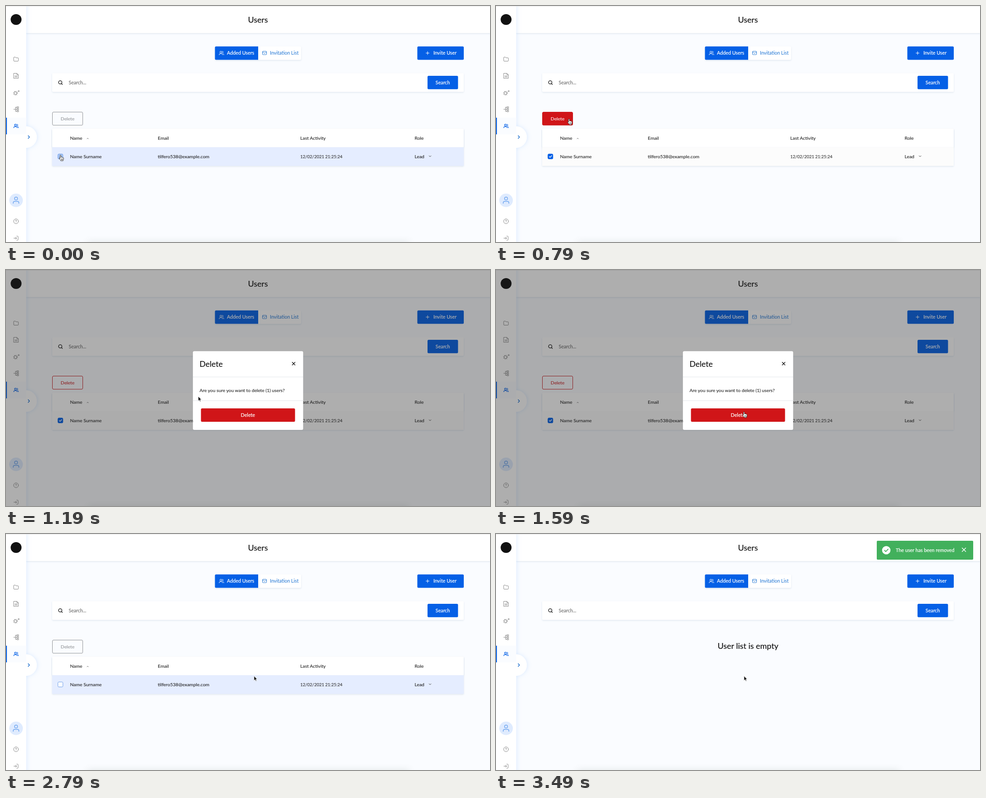
An HTML page for the animation above (3590 ms loop, 1069x524 px).

```html
<!DOCTYPE html>
<html lang="en">
<head>
<meta charset="utf-8">
<title>Users</title>
<style>
html, body { margin: 0; width: 100%; height: 100%; overflow: hidden; background: #fafcff; }
svg.stage { display: block; width: 100%; height: 100%; }
text { font: 10.4px Lato, "Open Sans", sans-serif; fill: #1c1c1c; stroke: #1c1c1c; stroke-width: .08; }
.big { font-size: 17.9px; fill: #111; stroke: #111; stroke-width: .15; }
.white { font-size: 10.75px; fill: #fff; stroke: #fff; stroke-width: .22; }
.mid { text-anchor: middle; }
.icon { fill: none; stroke: #777; stroke-width: 1; stroke-linecap: round; stroke-linejoin: round; }
.thin { stroke-width: .85; }
.blue { fill: #0560e6; }
.red { fill: #d01518; }
</style>
</head>
<body>
<svg class="stage" viewBox="0 0 1069 524" preserveAspectRatio="none">
  <defs>
    <filter id="card" x="-10%" y="-20%" width="120%" height="150%">
      <feDropShadow dx="0" dy="1.5" stdDeviation="1.8" flood-color="#34507c" flood-opacity=".13"/>
    </filter>
    <filter id="side" x="-60%" y="-60%" width="220%" height="220%">
      <feDropShadow dx="2" dy="0" stdDeviation="5" flood-color="#a9ccff" flood-opacity=".32"/>
    </filter>
    <filter id="soft" x="-10%" y="-200%" width="120%" height="500%">
      <feGaussianBlur stdDeviation="8"/>
    </filter>
    <g id="people">
      <circle cx="-1.4" cy="-2" r="2.1"/>
      <path d="M-5 4V3.2Q-5 1.3-3 1.3H.2Q2.2 1.3 2.2 3.2V4M2-4Q3.7-3.6 3.7-2T2 0M3.5 1.5Q5 1.8 5 3.3V4"/>
    </g>
  </defs>

  <rect width="1069" height="524" fill="#fafcff"/>
  <rect x="180" y="524" width="710" height="24" fill="#5a6b60" opacity=".14" filter="url(#soft)"/>
  <rect x="44" width="1025" height="60" fill="#fff" filter="url(#card)"/>
  <text class="big mid" x="556.5" y="36.5">Users</text>

  <!-- tabs and invite button -->
  <rect x="461.5" y="89.7" width="190.5" height="29.7" rx="3" fill="#fff" filter="url(#card)"/>
  <path class="blue" d="M464 89.7H557V119.4H464Q461.5 119.4 461.5 116.9V92.2Q461.5 89.7 464 89.7Z"/>
  <use href="#people" class="icon" x="476" y="104.5" style="stroke:#fff"/>
  <text class="white" x="488" y="108.3">Added Users</text>
  <g class="icon" style="stroke:#2b7cd6">
    <rect x="566.5" y="100.5" width="9" height="7.5" rx="1"/>
    <path d="M566.5 102L571 105L575.5 102"/>
  </g>
  <text x="583" y="108.3" style="fill:#2b7cd6;stroke:#2b7cd6;font-size:10.6px">Invitation List</text>
  <rect class="blue" x="908.5" y="89.7" width="102.6" height="29.7" rx="2.5"/>
  <path class="icon" d="M927.7 104.5H934.7M931.2 101V108" style="stroke:#fff"/>
  <text class="white" x="944" y="108.3">Invite User</text>

  <!-- search bar -->
  <rect x="102" y="149.3" width="909" height="41.2" rx="2" fill="#fff" filter="url(#card)"/>
  <g class="icon" style="stroke:#111;stroke-width:1.3">
    <circle cx="119.8" cy="169.5" r="3.7"/>
    <path d="M122.6 172.3L124.5 174.2"/>
  </g>
  <text x="138.5" y="173.8" style="fill:#666;stroke:#666;font-size:10.6px">Search...</text>
  <rect class="blue" x="931" y="155" width="67.4" height="29.7" rx="2.5"/>
  <text class="white mid" x="964.7" y="173.8">Search</text>

  <!-- user list -->
  <g id="list">
    <rect id="delBox" x="102.5" y="235.5" width="67" height="29.2" rx="2.5"/>
    <text id="delText" class="mid" x="136" y="254">Delete</text>
    <rect x="102" y="272.5" width="909" height="82.5" rx="2" fill="#fff" filter="url(#card)"/>
    <rect x="102" y="272.5" width="909" height="41" rx="2" fill="#fff" filter="url(#card)"/>
    <rect id="row" x="102" y="313.5" width="909" height="41.5"/>
    <g id="cells">
      <text x="141.5" y="296.6">Name</text>
      <path class="icon thin" d="M179 294.8L180.5 293.5L182 294.8" style="stroke:#444"/>
      <text x="335.3" y="296.6">Email</text>
      <text x="650" y="296.6">Last Activity</text>
      <text x="902.5" y="296.6">Role</text>
      <text x="141.5" y="337.5">Name Surname</text>
      <text x="335.3" y="337.5">tilfero538@example.com</text>
      <text x="650" y="337.5" style="fill:#333;font-size:9.5px">12/02/2021 21:25:24</text>
      <text x="902.5" y="337.5">Lead</text>
      <path class="icon" d="M934.5 332.6L936.6 334.7L938.7 332.6" style="stroke:#333"/>
      <rect id="box" x="114.7" y="328.6" width="11" height="11" rx="2.2"/>
      <path id="tick" class="icon" d="M117.6 334.2L119.5 336.1L122.9 332.3" style="stroke:#fff;stroke-width:1.4"/>
    </g>
  </g>
  <g id="spinner" fill="#eaf2ff">
    <circle id="ballA" cx="556.5" cy="314" opacity=".6"/>
    <circle id="ballB" cx="556.5" cy="314" opacity=".6"/>
  </g>
  <text id="empty" class="big mid" x="556.7" y="255">User list is empty</text>

  <!-- sidebar -->
  <circle cx="44" cy="291" r="24" fill="#fff" filter="url(#side)"/>
  <rect x="-10" y="-20" width="54.5" height="564" fill="#fff" filter="url(#side)"/>
  <circle cx="44" cy="291" r="24" fill="#fff"/>
  <path class="icon" d="M49 288L52 291L49 294" style="stroke:#0560c8;stroke-width:1.4"/>
  <circle cx="22.3" cy="30" r="12" fill="#111"/>
  <rect y="248" width="44.5" height="37" fill="#fafcff"/>
  <rect class="blue" y="248" width="2" height="37"/>
  <g class="icon thin">
    <path d="M17 114.5Q17 113.5 18 113.5H20.7L22 115H26.3Q27.3 115 27.3 116V121.5Q27.3 122.5 26.3 122.5H18Q17 122.5 17 121.5Z"/>
    <path d="M17.3 149.5H24L27.3 152.8V160.5H17.3ZM24 149.5V152.8H27.3M19.5 155.3H25M19.5 157.7H25"/>
    <circle cx="21" cy="193.5" r="3"/>
    <circle cx="21" cy="193.5" r="4.3" stroke-width="1.5" stroke-dasharray="1.2 2.177" stroke-linecap="butt"/>
    <circle cx="27.8" cy="189" r="1.3"/>
    <path d="M17 229.3H24M21 225H24M21 233.5H24M21 225V233.5"/>
    <rect x="24.5" y="223.7" width="3.3" height="2.7"/>
    <rect x="24.5" y="228" width="3.3" height="2.7"/>
    <rect x="24.5" y="232.2" width="3.3" height="2.7"/>
    <use href="#people" x="22.3" y="266.5" style="stroke:#0560e6;stroke-width:1.2"/>
    <circle cx="22.2" cy="478" r="5.3"/>
    <path d="M20.7 476.9Q20.7 475.4 22.2 475.4T23.7 476.8Q23.7 477.7 22.2 478.5M22.2 480.6V480.7"/>
    <path d="M23.5 511H25.5Q26.8 511 26.8 512.3V518.7Q26.8 520 25.5 520H23.5M17.3 515.5H23.5M21.2 513.2L23.5 515.5L21.2 517.8"/>
  </g>
  <circle cx="22.2" cy="431.5" r="15" fill="#dfebfe"/>
  <g class="icon" style="stroke:#72a8f0;stroke-width:1.5">
    <circle cx="22.2" cy="427.5" r="3.3"/>
    <path d="M16 438.3V437Q16 433.8 19 433.8H25.4Q28.4 433.8 28.4 437V438.3"/>
  </g>
  <rect width="1069" height="1" fill="#e6e6e6"/>

  <!-- confirmation -->
  <g id="modal">
    <rect width="1069" height="524" fill="#202020" opacity=".36"/>
    <rect x="412.8" y="180.3" width="243.5" height="174.7" rx="3" fill="#fff"/>
    <text class="big" x="427.5" y="215" style="font-size:17.5px">Delete</text>
    <path class="icon" d="M632.2 204.8L638.4 211M638.4 204.8L632.2 211" style="stroke:#111;stroke-width:1.3"/>
    <path d="M413 237.5H656M413 290H656" stroke="#e3e6ea" fill="none"/>
    <text x="427.5" y="271" style="font-size:10.25px">Are you sure you want to delete (1) users?</text>
    <rect class="red" x="430.6" y="307.2" width="207.8" height="29.7" rx="2.5"/>
    <text class="white mid" x="534.3" y="325.7">Delete</text>
  </g>

  <!-- notice -->
  <g id="toast">
    <rect x="841" y="15" width="213" height="42" rx="2" fill="#42b05c"/>
    <circle cx="862" cy="36" r="9.3" fill="#fff"/>
    <path class="icon" d="M858.2 36.3L861 39L866 33.6" style="stroke:#42b05c;stroke-width:1.8"/>
    <text class="white" x="883" y="40">The user has been removed</text>
    <path class="icon" d="M1029.5 31L1037.5 39M1037.5 31L1029.5 39" style="stroke:#fff;stroke-width:1.5"/>
  </g>

  <g id="cursor">
    <g id="hand" stroke="#222" stroke-width=".9" stroke-linejoin="round" stroke-linecap="round">
      <path fill="#fff" d="M-1.2 1Q-1.2-.3 0-.3T1.1 1V4.6Q1.3 3.7 2.2 3.8T3.1 4.8Q3.5 4 4.3 4.2T5 5.3Q5.6 4.8 6.2 5.2T6.6 6.5V8.5Q6.5 9.8 5.7 10.8V12.2H.3V11.2Q-1 9.8-2.6 7.6Q-3.4 6.3-2.6 5.9T-1.2 6.7Z"/>
      <path fill="none" stroke-width=".7" d="M1.5 7.7V10.2M3 7.7V10.2M4.5 7.7V10.2"/>
    </g>
    <path id="arrow" d="M0 0V10.2L2.4 8L4 11.6L5.6 10.9L4.1 7.4H7.2Z" fill="#111" stroke="#fff" stroke-width=".8"/>
  </g>
</svg>
<script>
const LOOP = 3590, TICK = 50, OFFSET = 40;
const $ = id => document.getElementById(id);
const ramp = (t, a, b) => Math.min(1, Math.max(0, (t - a) / (b - a)));
const ease = k => k * k * (3 - 2 * k);
const lerp = (a, b, k) => a + (b - a) * k;
const blend = (a, b, k) => a.map((v, i) => Math.round(lerp(v, b[i], k)));
const rgb = c => `rgb(${c})`;
const show = (id, on) => { $(id).style.display = on ? "" : "none"; };
const set = (id, attrs) => { for (const k in attrs) $(id).setAttribute(k, attrs[k]); };

const GRAY = [145, 147, 150], RED = [200, 30, 34], WHITE = [255, 255, 255];

// pointer stops: time, x, y
const PATH = [
  [0, 120.5, 331.5], [240, 120.5, 331.5], [740, 161.5, 251.3],
  [890, 160.5, 250.5], [1390, 568, 297], [1590, 547.8, 315.3]
];

function pointer(t) {
  const i = PATH.findIndex(p => p[0] > t);
  if (i < 0) return PATH[PATH.length - 1].slice(1);
  const [a, b] = [PATH[i - 1], PATH[i]];
  const k = ease(ramp(t, a[0], b[0]));
  return [lerp(a[1], b[1], k), lerp(a[2], b[2], k)];
}

function draw(time) {
  const t = Math.max(0, Math.floor((time - OFFSET) / TICK) * TICK + OFFSET);
  const modal = t >= 890 && t < 2140;
  const loading = t >= 2940 && t < 3490;
  const done = t >= 3490;
  const checked = t >= 140 && t < 2140;
  const [x, y] = pointer(t);

  const overBox = t < 890 && y > 327;
  const overDelete = t < 890 && y < 265;
  const overConfirm = t >= 890 && t < 2790 && y > 306;
  const hand = overBox || overDelete || overConfirm;
  set("cursor", { transform: `translate(${x} ${y})` });
  show("hand", hand);
  show("arrow", !hand);

  const enabled = t < 140 ? 0 : 1 - ramp(t, 2340, 2440);
  const filled = ramp(t, 540, 740) * (1 - ramp(t, 890, 1090));
  const tone = blend(GRAY, RED, enabled);
  const label = rgb(blend(tone, WHITE, filled));
  set("delBox", { stroke: rgb(tone), fill: "#d01518", "fill-opacity": filled });
  Object.assign($("delText").style, { fill: label, stroke: label });

  const rowHover = (t < 890 && y > 313) || (t >= 2140 && t < 2940);
  set("row", { fill: rowHover ? "#e5edff" : "#fcfcfc" });
  set("cells", { opacity: loading ? .3 : 1 });
  set("box", {
    fill: checked ? "#0560e6" : overBox ? "#a9c5f2" : "#fff",
    stroke: checked ? "#0560e6" : loading ? "#777" : "#6d9eea"
  });
  show("tick", checked);

  const grow = ease(ramp(t, 2940, 3940));
  set("ballA", { r: 30.5 * (1 - grow) });
  set("ballB", { r: 30.5 * grow });

  show("list", !done);
  show("spinner", loading);
  show("empty", done);
  show("modal", modal);
  show("toast", t >= 2940);
}

const start = performance.now();
function frame() {
  draw((performance.now() - start) % LOOP);
  requestAnimationFrame(frame);
}
frame();
</script>
</body>
</html>
```
